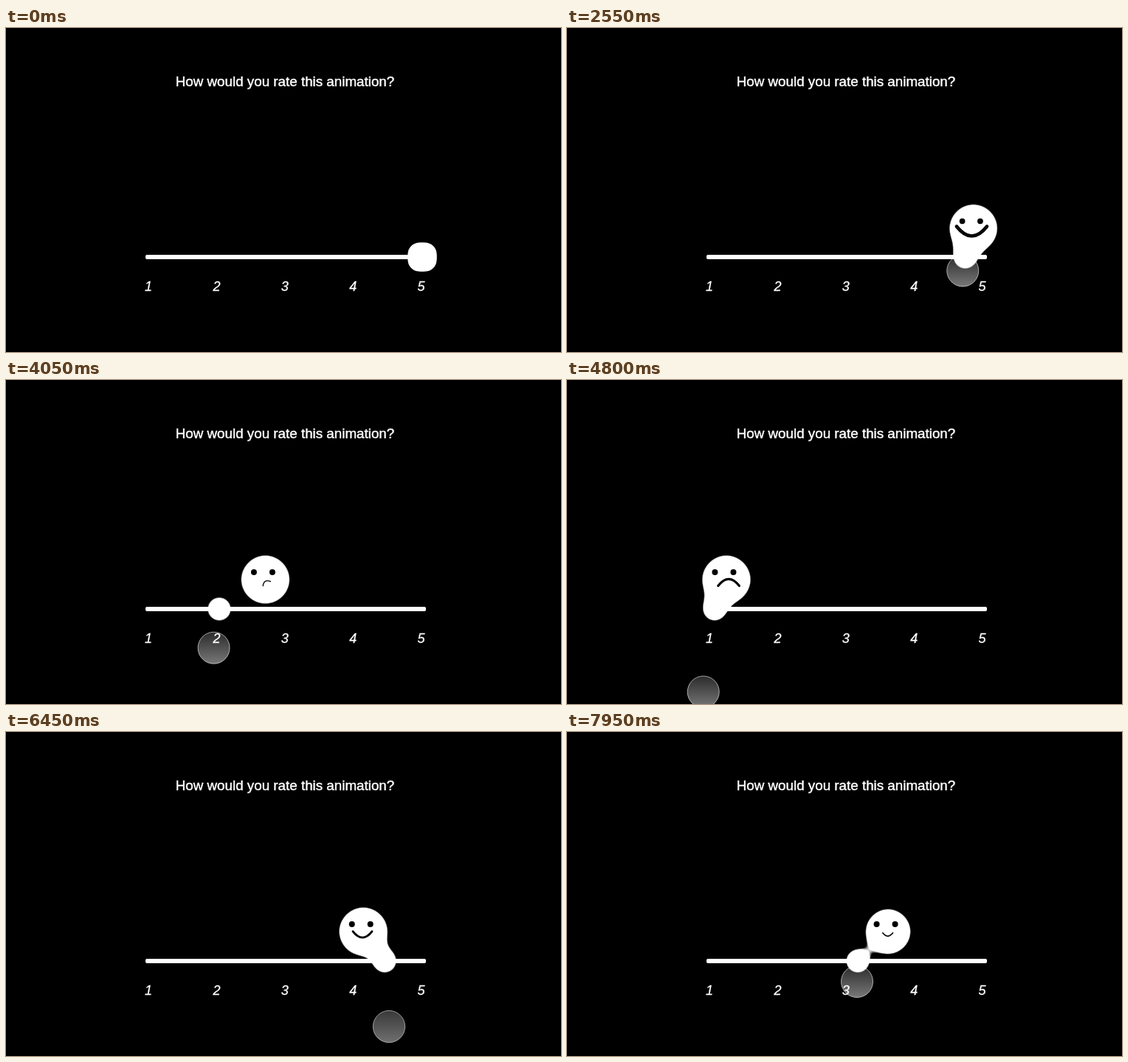
Animation, 752 px wide and 440 px high, one loop 8 s. Source, as an HTML page:

```html
<!DOCTYPE html>
<html lang="en">
<head>
<meta charset="utf-8">
<title>Rating slider</title>
<style>
html, body { margin: 0; width: 100%; height: 100%; overflow: hidden; background: #000; }
svg { display: block; width: 752px; height: 440px; }
text { font: 18.8px "Liberation Sans", Arial, sans-serif; fill: #fff; stroke: #fff; stroke-width: .45; text-anchor: middle; }
.label { font-size: 18px; font-style: italic; stroke-width: .3; }
</style>
</head>
<body>
<svg viewBox="0 0 752 440">
  <defs>
    <filter id="goo" filterUnits="userSpaceOnUse" x="0" y="150" width="752" height="290">
      <feGaussianBlur stdDeviation="10"/>
      <feColorMatrix values="1 0 0 0 0  0 1 0 0 0  0 0 1 0 0  0 0 0 18 -7"/>
    </filter>
    <linearGradient id="glass" x2="0" y2="1">
      <stop id="top" stop-color="#fff"/>
      <stop id="bottom" offset="1" stop-color="#fff"/>
    </linearGradient>
  </defs>
  <text x="378" y="79">How would you rate this animation?</text>
  <rect x="189" y="308" width="380" height="6" rx="2" fill="#fff"/>
  <g id="labels"></g>
  <g filter="url(#goo)" fill="#fff">
    <circle id="base" cy="311"/>
    <circle id="head"/>
  </g>
  <rect id="knob" x="-19.5" y="-19.5" width="39" height="39" rx="15.5" fill="#fff"/>
  <g id="face">
    <circle cx="-15.5" cy="-10" r="4"/>
    <circle cx="9.5" cy="-10" r="4"/>
    <path id="mouth" d="M-22 -7Q0 21 22 -7" fill="none" stroke="#000" stroke-width="5" stroke-linecap="round"/>
  </g>
  <circle id="touch" r="21.5" fill="url(#glass)" stroke="#fff"/>
  <path id="arrow" d="M0 0V15.5L3.6 12.2 6 17.8 8.6 16.7 6.2 11.2H11Z" fill="#000" stroke="#fff" stroke-linejoin="round"/>
</svg>
<script>
const LOOP = 8000, ENTER = 150, PRESS = 1600, DRAG = 2100;
const MID = 378.5, REACH = 178.5, HEAD_LAG = 200, BASE_LAG = 30;

// Pointer stops: time, x, y
const STOPS = [
  [ENTER, 615, 333], [450, 569, 327], [1050, 563, 317], [1350, 553, 324],
  [2200, 554, 326], [3500, 455, 346], [4150, 270, 365], [5000, 171, 433],
  [6000, 465, 401], [7200, 635, 398], [7950, 393, 339]
];

const $ = id => document.getElementById(id);
const set = (id, attrs) => {
  for (const k in attrs) $(id).setAttribute(k, attrs[k]);
};
const show = on => on ? "visible" : "hidden";
const clamp = (v, a, b) => Math.min(b, Math.max(a, v));
const smooth = (a, b, v) => {
  const k = clamp((v - a) / (b - a), 0, 1);
  return k * k * (3 - 2 * k);
};

// Eases from each stop to the next
function pointer(t) {
  let [last, x, y] = STOPS[0];
  for (const [time, nx, ny] of STOPS.slice(1)) {
    const k = smooth(last, time, t);
    x += (nx - x) * k;
    y += (ny - y) * k;
    last = time;
  }
  return { x, y };
}

// Slider position that trails the pointer
const follow = (t, lag) => clamp(pointer(t - lag).x, MID - REACH, MID + REACH);

for (let i = 0; i < 5; i++) {
  $("labels").innerHTML += `<text class="label" x="${193 + 92.4 * i}" y="357">${i + 1}</text>`;
}

function draw(t) {
  const grow = smooth(DRAG, DRAG + 500, t), rest = 1 - grow;
  const start = MID + REACH + 7;
  const settle = (lag) => start + (follow(Math.max(t, DRAG), lag) - start) * grow;
  const baseX = settle(BASE_LAG), x = settle(HEAD_LAG), y = 311 - 40 * grow;
  set("base", { cx: baseX, r: 20 - 3.5 * grow });
  set("head", { cx: x, cy: y, r: 18 + 14 * grow - 2.3 * smooth(7750, 7950, t) });
  set("knob", { transform: `translate(${baseX} 311) scale(${rest})` });

  // The mouth is one smile: it shrinks near the middle and turns over below it
  const mood = (x - MID) / 185;
  const size = Math.max(.27, Math.abs(mood) * (mood < 0 ? .74 : 1.03));
  const turn = 180 * (1 - smooth(-.25, .15, mood));
  set("face", { transform: `translate(${x} ${y}) scale(${grow})`, opacity: grow });
  set("mouth", { transform: `translate(${.5 - 3 * mood} 4) rotate(${turn}) scale(${size})` });

  const touch = pointer(t);
  const flip = smooth(6300, 7000, t) - smooth(7250, 7700, t);
  set("top", { "stop-opacity": .17 + .45 * flip });
  set("bottom", { "stop-opacity": .47 - .27 * flip });
  set("touch", {
    cx: touch.x, cy: touch.y, r: 21.5 + 1.5 * flip,
    "stroke-opacity": .6 * (1 - flip), visibility: show(t >= PRESS)
  });
  set("arrow", {
    transform: `translate(${touch.x} ${touch.y})`,
    visibility: show(t >= ENTER && t < PRESS)
  });
}

function tick(now) {
  draw(now % LOOP);
  requestAnimationFrame(tick);
}
draw(0);
requestAnimationFrame(tick);
</script>
</body>
</html>
```
